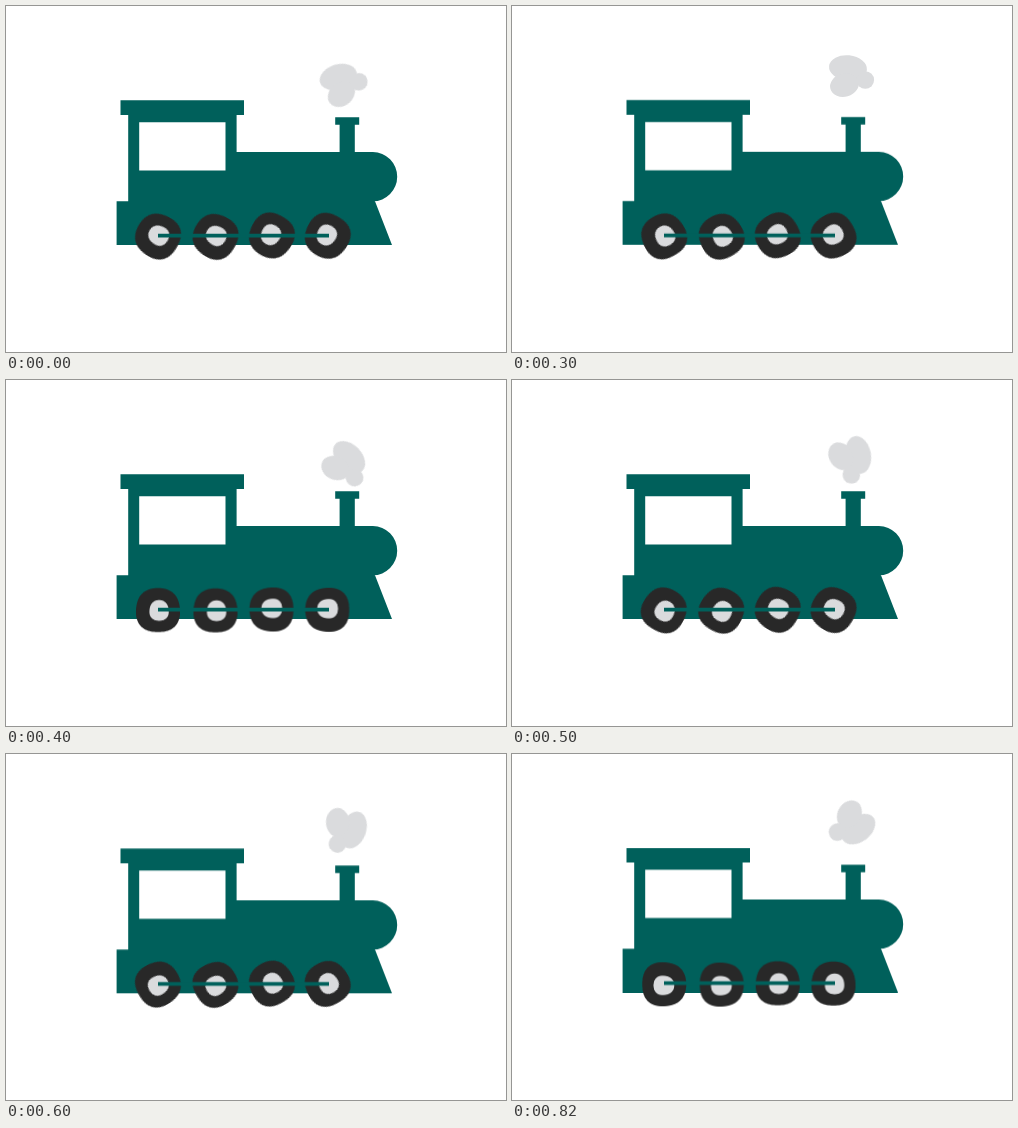
Animation, 500 px wide and 346 px high, one loop 900 ms. Source, as an HTML page:

```html
<!DOCTYPE html>
<html lang="en">
<head>
<meta charset="utf-8">
<title>Steam train</title>
<style>
  html, body { margin: 0; width: 100%; height: 100%; overflow: hidden; background: #fff; }
  svg { display: block; width: 100vw; height: 100vh; }
  .green { fill: #00605b; }
  .tyre { fill: #282828; }
  .pale { fill: #dadbdd; }
</style>
</head>
<body>
<svg viewBox="0 0 500 346">
  <g id="smoke" class="pale">
    <ellipse cx="-4" cy="-8" rx="19" ry="12.7" transform="rotate(6 -4 -8)"/>
    <ellipse cx="-7.5" cy="9" rx="14.6" ry="11.7" transform="rotate(-16 -7.5 9)"/>
    <circle cx="13.3" cy="4" r="8.8"/>
  </g>
  <g id="body" class="green">
    <path fill-rule="evenodd" d="M114.5 94.3H238V109H230.6V146.1H333.6V118.8H329.2V111.2H353.2V118.8H348.8V146.1H366.9
      A24.3 24.6 0 0 1 366.9 195.3H369L386 239H110.6V195.3H122.2V109H114.5Z M133.2 116.3V164.6H219.5V116.3Z"/>
  </g>
  <g id="wheels"></g>
  <path id="rod" class="green" d="M152 227.7H323V231.6H152Z"/>
</svg>
<script>
const NS = "http://www.w3.org/2000/svg";
const LOOP = 900;
const starts = [0, 300, 400, 500, 600, 700];
const byId = id => document.getElementById(id);

// Centre of the puff and its turn at each step
const puffs = [
  [339, 77, -22], [340, 70, 0], [341, 86, 40],
  [339.6, 81, 74], [338.6, 78, 104], [338, 72, 137]
];
const bob = [0, -0.2, 0, 0, 0.3, -0.5];

// Wheel centre and starting turn
const wheels = [[152, 230.3, 0], [209.5, 230.6, 0], [265.7, 229.5, -90], [321.5, 229.8, -90]];

function hold(el, pose) {
  const frames = starts.map((t, i) => ({
    offset: t / LOOP, transform: pose(i), easing: "steps(1, end)"
  }));
  frames.push({ offset: 1, transform: pose(starts.length - 1) });
  el.animate(frames, { duration: LOOP, iterations: Infinity });
}

function add(parent, tag, attrs = {}) {
  const el = document.createElementNS(NS, tag);
  for (const k in attrs) el.setAttribute(k, attrs[k]);
  return parent.appendChild(el);
}

function blob(radius, cx = 0, cy = 0) {
  let d = "";
  for (let i = 0; i < 90; i++) {
    const a = i * Math.PI / 45, r = radius(a);
    d += (i ? "L" : "M") + (cx + r * Math.cos(a)).toFixed(2) + " " + (cy + r * Math.sin(a)).toFixed(2);
  }
  return d + "Z";
}

const tyre = blob(a => 22.6 - 0.6 * Math.cos(4 * a) + 0.3 * Math.sin(3 * a));
const hub = blob(a => 10.2 - 0.35 * Math.cos(2 * a) - 0.2 * Math.cos(4 * a) + 0.2 * Math.sin(3 * a), 1.1, 0.3);

for (const [x, y, turn] of wheels) {
  const g = add(byId("wheels"), "g");
  add(g, "path", { d: tyre, class: "tyre" });
  add(g, "path", { d: hub, class: "pale" });
  hold(g, i => `translate(${x}px, ${y}px) rotate(${turn + 30 * (i - 2)}deg)`);
}

hold(byId("smoke"), i => {
  const [x, y, turn] = puffs[i];
  return `translate(${x}px, ${y}px) rotate(${turn}deg)`;
});
for (const id of ["body", "rod"]) hold(byId(id), i => `translate(0px, ${bob[i]}px)`);
</script>
</body>
</html>
```
